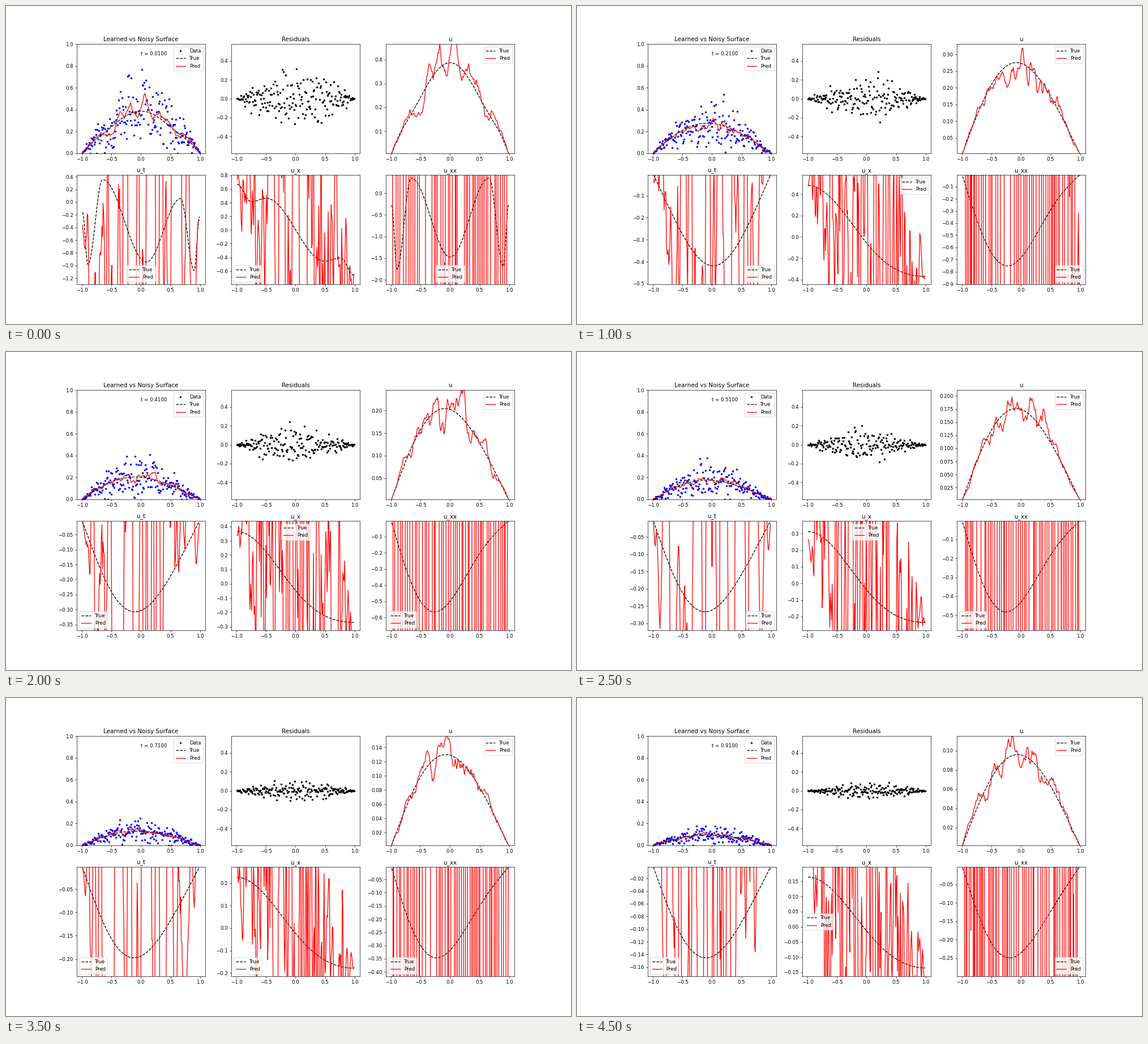
A matplotlib script that plays this animation: 998 px wide and 561 px high, repeating every 5 s.

```python
import numpy as np
import matplotlib.pyplot as plt
from matplotlib.animation import FuncAnimation

WIDTH, HEIGHT = 998, 561
DPI = WIDTH / 16
N, PAD = 200, 20
FRAMES = 10
x = np.linspace(-0.99, 0.99, N)

# Turning points of the curves at the first step
EARLY_X = [(-.99, .67), (-.75, .415), (-.5, .465), (.5, -.455), (.76, -.405), (.99, -.66)]
EARLY_XX = [(-.99, -.28), (-.9, -1.75), (-.66, .345), (0, -1.475), (.66, .345),
            (.9, -1.69), (.99, -.27)]
EARLY_T = [(-.99, -.16), (-.9, -.985), (-.65, .355), (.09, -.945), (.67, .055),
           (.9, -1.08), (.99, -.23)]

# Legend corner of each lower panel, step by step
CORNERS = {"N": "upper center", "NE": "upper right", "S": "lower center",
           "SE": "lower right", "SW": "lower left", "W": "center left", "C": "center"}
LEGENDS = {"u": ["NE"] * FRAMES,
           "u_t": "S C SE SW SW SE SW SW SW SW".split(),
           "u_x": "SW NE NE N N N SW SW SW W".split(),
           "u_xx": "S SW SE SW SW SW SE SW SE SE".split()}


def swing(points):
    """Half-cosine curve through a list of turning points."""
    px, py = np.array(points).T
    i = np.clip(np.searchsorted(px, x) - 1, 0, len(px) - 2)
    f = (x - px[i]) / (px[i + 1] - px[i])
    return py[i] + (py[i + 1] - py[i]) * (1 - np.cos(np.pi * f)) / 2


def early_curves():
    ux = swing(EARLY_X)
    u = np.cumsum(ux)
    u -= np.interp(x, x[[0, -1]], u[[0, -1]])
    return .007 + .38 * u / u.max(), swing(EARLY_T), ux, swing(EARLY_XX)


def series(weights, order=0):
    """Sine series that vanishes at both ends, or its derivative in x."""
    total = np.zeros(N)
    for n, w in enumerate(weights, 1):
        q = n * np.pi / 2
        total += w * q ** order * np.sin(q * (x + 1) + order * np.pi / 2)
    return total


def decay_curves(t):
    """Three decaying modes; the second is fed by the first."""
    e1, e2, e2b, e3 = np.exp(-t * np.array([1.5, 3, 6, 20]))
    a = (.374 * e1, .0725 * (e2 - e2b), -.03 * e3)
    rate = (-.561 * e1, .0725 * (6 * e2b - 3 * e2), .6 * e3)
    return series(a), series(rate), series(a, 1), series(a, 2)


def smooth(v, *widths):
    for w in widths:
        v = np.convolve(v, np.ones(w) / w, "same")
    return v


def make_step(k):
    rng = np.random.default_rng(40 + k)
    u, ut, ux, uxx = decay_curves(.01 + .1 * k) if k else early_curves()
    mid = slice(PAD, PAD + N)

    noise = np.clip(rng.normal(0, .45, N + 2 * PAD), -1.1, 1.15)
    data = np.clip(u * (1 + noise[mid]), 0, None)
    error = u * smooth(noise, 11, 2)[mid]

    slope = 1.4 * np.gradient(error, x)
    bend = smooth(np.gradient(slope, x), 3)
    drift = smooth(rng.normal(size=N + 2 * PAD), 5, 3)[mid]
    drift *= 3 * np.ptp(ut) / drift.std() * u / u.max()
    return data, [(u, u + error), (ut, ut + drift), (ux, ux + slope), (uxx, uxx + bend)]


steps = [make_step(k) for k in range(FRAMES)]

fig, axes = plt.subplots(2, 3, figsize=((WIDTH + .01) / DPI, (HEIGHT + .01) / DPI), dpi=DPI)
fig.subplots_adjust(left=.125, right=.9, bottom=.125, top=.88, wspace=.2, hspace=.2)
surface, resid = axes[0, :2]
panels = dict(zip(LEGENDS, [axes[0, 2], *axes[1]]))


def add_pair(ax):
    true, = ax.plot(x, 0 * x, "k--", label="True")
    pred, = ax.plot(x, 0 * x, "r", label="Pred")
    return true, pred


def set_pair(pair, curves):
    for line, y in zip(pair, curves):
        line.set_ydata(y)


for ax, title in zip(axes.flat, ["Learned vs Noisy Surface", "Residuals", *panels]):
    ax.set_title(title)
    ax.set_xlim(-1.09, 1.09)

dots, = surface.plot(x, 0 * x, "b.", label="Data")
surface_pair = add_pair(surface)
surface.set_ylim(0, 1)
surface.legend(loc="upper right")
clock = surface.text(0, .9, "")
resid_dots, = resid.plot(x, 0 * x, "k.")
resid.set_ylim(-.578, .578)
pairs = [add_pair(ax) for ax in panels.values()]


def update(k):
    data, curves = steps[k]
    dots.set_ydata(data)
    resid_dots.set_ydata(data - curves[0][1])
    set_pair(surface_pair, curves[0])
    clock.set_text(f"t = {.01 + .1 * k:.4f}")
    for (name, ax), pair, both in zip(panels.items(), pairs, curves):
        set_pair(pair, both)
        ax.set_ylim(1.2 * both[0].min(), 1.2 * both[0].max())
        ax.legend(loc=CORNERS[LEGENDS[name][k]])


anim = FuncAnimation(fig, update, frames=FRAMES, interval=500,
                     init_func=lambda: update(0), repeat=True, repeat_delay=0)
plt.show()
```
